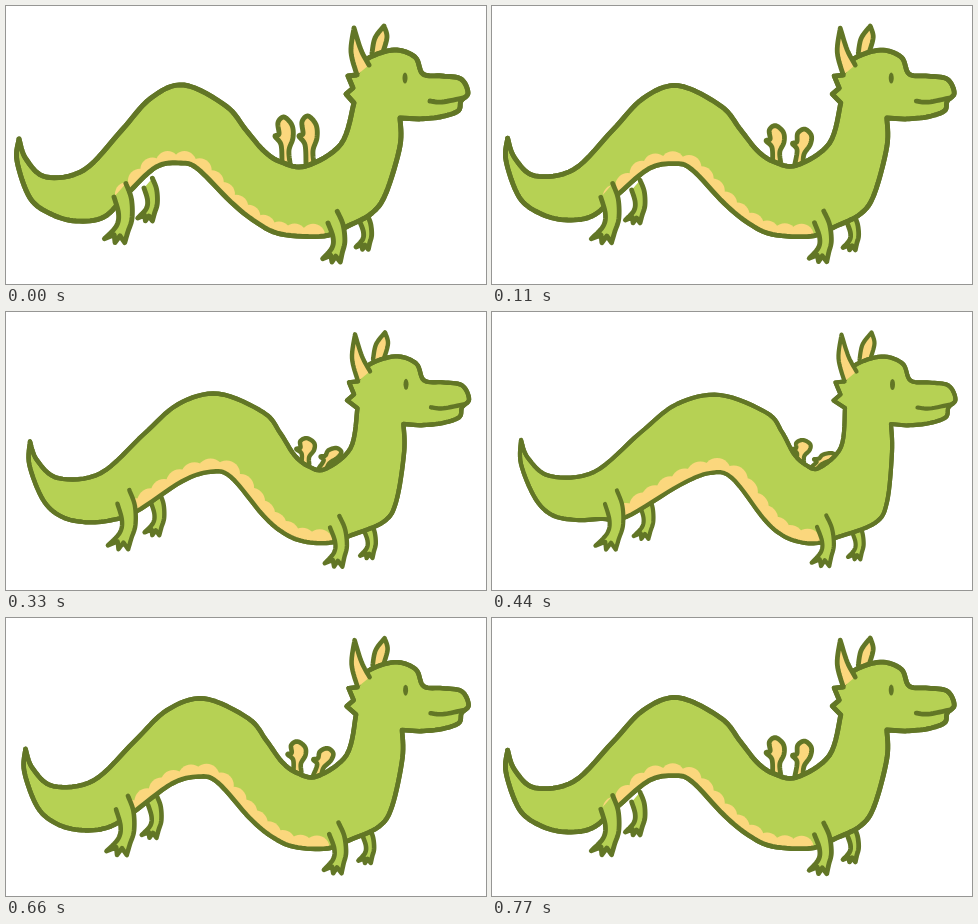
An HTML page with a canvas for the animation above (880 ms loop, 480 by 278 pixels).

```html
<!DOCTYPE html>
<html lang="en">
<head>
<meta charset="utf-8">
<title>Dragon</title>
<style>
html, body { margin: 0; width: 100%; height: 100%; overflow: hidden; background: #fff; }
canvas { display: block; width: 480px; height: 278px; }
</style>
</head>
<body>
<canvas id="stage" width="480" height="278"></canvas>
<script>
const ctx = document.getElementById('stage').getContext('2d');
const GREEN = '#b6d154', LINE = '#627626', GOLD = '#fbd77d';
const STEP = 110, HALF = 4;

const pts = s => s.split(' ').map(p => p.split(',').map(Number));
const mix = (a, b, t) => a + (b - a) * t;

// Key points: x, y and how far each travels as the wave rolls forward
const BACK = pts('13,133,16,-5 20,153,16,-7 40,171,18,-7 78,164,24,-4 115,125,33,-4 145,92,40,0 178,79,50,4 ' +
  '220,100,55,1 240,124,50,-4 258,145,44,-3 275,156,39,-3 300,160,27,-4 335,138,14,-3 348,97,5,-1');
const TAIL = pts('13,133,16,-5 11,155,18,-3 24,192,19,-6 45,208,15,-5 70,215,14,-7 98,211,10,-4');
const BELLY = pts('121,188,13,17 150,161,38,12 175,157,43,4 192,163,48,3 225,196,47,11 250,216,40,7 ' +
  '275,228,33,2 318,230,8,1');
const CHEST = pts('342,220,4,5 366,207,17,4 380,187,15,3 394,140,6,0 394,112,5,0');

// Legs: the same four numbers, then size and lean
const FAR_LEGS = pts('138,182,10,12,.7,0 354,216,6,4,.58,.05');
const NEAR_LEGS = pts('108,191,5,1,.97,-.02 322,217,3,-2,.83,.06');
const SHIN = pts('0,0 5,17 3,30 -9,43');
const TOES = pts('1,39 2,47 7,40');
const CALF = pts('12,47 15,36 19,22 18,2 12,-14');

const SKULL = pts('350,69 361,53 388,44 409,51 417,68 436,70 455,73 462,87 455,95 452,105 434,111 413,113');
const TUFT = pts('340,88 347,82 342,70');
const NEAR_HORN = [pts('351,69 345,46 348,22'), pts('348,22 355,44 363,59')];
const FAR_HORN = [pts('366,47 369,32 378,20'), pts('378,20 381,31 377,46')];
const MOUTH = pts('424,95 436,96 457,92');
const WING = pts('-4,0 -5,-.4 -11,-.58 -7,-.63 -8,-.88 -2,-1 6,-.82 7,-.55 3,-.28 4,0');

const travel = (list, t) => list.map(([x, y, dx, dy]) => [x + dx * t, y + dy * t]);

// Catmull-Rom samples through the points
function curve(p, n = 8) {
  const out = [];
  for (let i = 0; i < p.length - 1; i++) {
    const a = p[i - 1] || p[i], b = p[i], c = p[i + 1], d = p[i + 2] || c;
    for (let k = 0; k < n; k++) {
      const t = k / n;
      out.push([0, 1].map(j => b[j] + .5 * t * (c[j] - a[j] +
        t * (2 * a[j] - 5 * b[j] + 4 * c[j] - d[j] + t * (3 * (b[j] - c[j]) + d[j] - a[j])))));
    }
  }
  out.push(p[p.length - 1]);
  return out;
}

function trace(p) {
  ctx.beginPath();
  p.forEach(q => ctx.lineTo(...q));
}

function shape(p, fill) {
  trace(p);
  ctx.fillStyle = fill;
  ctx.fill();
  ctx.stroke();
}

function legs(list, t) {
  for (const [x, y, dx, dy, size, lean] of list) {
    const place = p => p.map(([u, v]) => [x + dx * t + size * (u + lean * v), y + dy * t + size * v]);
    shape([...curve(place(SHIN)), ...place(TOES), ...curve(place(CALF))], GREEN);
  }
}

function wing(x, y, height, lean) {
  shape(curve(WING.map(([u, v]) => [x + u - lean * v, y + height * v])), GOLD);
}

// The wings fold quickly, then sink behind the back
function wings(t) {
  const fold = Math.sqrt(t);
  wing(mix(280, 308, t), mix(157, 150, t), mix(46, 22, fold), 5 * t);
  wing(mix(304, 322, t), mix(158, 156, t), mix(48, 15, fold), 19 * fold);
}

function scales(line, r) {
  ctx.fillStyle = GOLD;
  let gap = 17;
  line.forEach((q, i) => {
    if (i) gap += Math.hypot(q[0] - line[i - 1][0], q[1] - line[i - 1][1]);
    if (gap < 17) return;
    gap -= 17;
    ctx.beginPath();
    ctx.arc(...q, r, 0, 7);
    ctx.fill();
  });
}

function body(t, nod) {
  const under = curve(travel([...TAIL, ...BELLY, ...CHEST], t));
  const outline = [
    ...curve(travel(BACK, t)), ...nod(TUFT), ...curve(nod(SKULL)), ...under.reverse()
  ];
  shape(outline, GREEN);
  ctx.save();
  ctx.clip();
  scales(curve(travel(BELLY, t), 16), mix(12, 14, t));
  ctx.restore();
  trace(outline);
  ctx.stroke();
}

function horn(sides, nod) {
  shape(sides.flatMap(side => curve(nod(side))), GOLD);
}

function face(nod) {
  horn(NEAR_HORN, nod);
  trace(curve(nod(MOUTH)));
  ctx.stroke();
  const [eye] = nod([[399, 72]]);
  ctx.fillStyle = LINE;
  ctx.beginPath();
  ctx.ellipse(...eye, 2.5, 5.5, 0, 0, 7);
  ctx.fill();
}

function draw(t) {
  const nod = list => list.map(([x, y]) => [x + 1.5 * t, y + t / 2]);
  ctx.fillStyle = '#fff';
  ctx.fillRect(0, 0, 480, 278);
  ctx.strokeStyle = LINE;
  ctx.lineWidth = mix(4.9, 4.2, t);
  ctx.lineJoin = ctx.lineCap = 'round';
  wings(t);
  legs(FAR_LEGS, t);
  horn(FAR_HORN, nod);
  body(t, nod);
  legs(NEAR_LEGS, t);
  face(nod);
}

const start = performance.now();
function tick() {
  const step = Math.floor((performance.now() - start) / STEP) % (2 * HALF);
  const there = 1 - Math.abs(step - HALF) / HALF;
  draw(there ** 1.3);
  requestAnimationFrame(tick);
}
tick();
</script>
</body>
</html>
```
